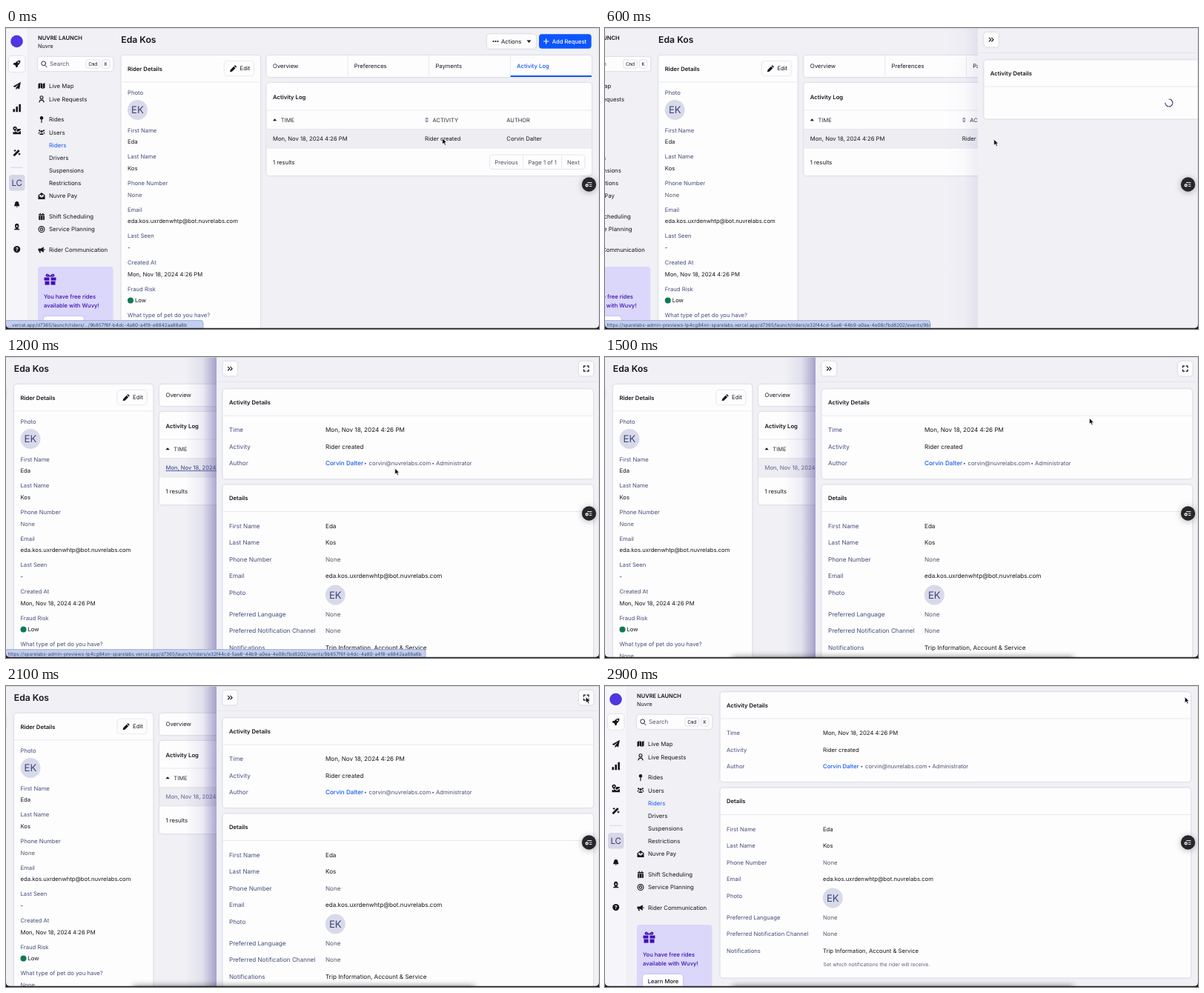
An HTML page that plays this animation: 800 px wide and 406 px high, repeating every 3000 ms.

```html
<!DOCTYPE html>
<html lang="en">
<head>
<meta charset="utf-8">
<title>Rider activity log</title>
<style>
  html, body { margin: 0; width: 100%; height: 100%; overflow: hidden; background: #f0f0f5; }
  svg { display: block; width: 800px; height: 406px; font-family: Inter, sans-serif; text-rendering: geometricPrecision; }
  .card { fill: #fdfdfe; filter: drop-shadow(0 .6px 1px rgba(30, 35, 80, .22)); }
  .mono { font-family: "Noto Sans Mono", monospace; }
  #badge { filter: drop-shadow(0 1px 4px rgba(0, 0, 0, .3)); }
  #dock { filter: blur(4px); }
</style>
</head>
<body>
<svg id="stage" viewBox="0 0 800 406"></svg>
<script>
const INK = '#15161c', LABEL = '#434d7a', MUTED = '#555a6c', BLUE = '#1659f2', RULE = '#e3e4eb';
const FIRST = 'Eda', LAST = 'Kos', MAIL = 'eda.kos.uxrdenwhtp@bot.nuvrelabs.com', CREATED = 'Mon, Nov 18, 2024 4:26 PM';
const ITEM = '9b857f6f-b4dc-4a80-a4f8-e8842aa88a6b';
const SHORT_URL = '...vercel.app/d7365/launch/riders/.../' + ITEM;
const LONG_URL = 'https://sparelabs-admin-previews-lp4cg84xn-sparelabs.vercel.app/d7365/launch/riders/' +
  'e32f44cd-5ae6-44b9-a0ea-4e08cfbd8202/events/' + ITEM;

// Solid icons on a 16-unit grid
const ICONS = {
  rocket: 'M15 1C10 .5 7 3 5 6H2L0 10h3l3 3v3l4-2v-3c3-2 5.500-5 5-10zM11 3.500a1.500 1.500 0 110 3 1.500 1.500 0 010-3z',
  plane: 'M16 0L0 9l4 2 8-7-6 8v4l3-3 4 2z',
  bars: 'M0 10h4v6H0zM6 5h4v11H6zM12 0h4v16h-4z',
  place: 'M4 0a4 4 0 014 4c0 2-4 6-4 6S0 6 0 4a4 4 0 014-4zM4 2.500a1.500 1.500 0 100 3 1.500 1.500 0 000-3zM9 5h7v2l-6 4-3-2zM0 11l3 1 2-2 5 3 6-4v7H0z',
  wand: 'M0 13L11 2l3 3L3 16zM4 1l1 2 2 1-2 1-1 2-1-2-2-1 2-1zM13 8l1 2 2 1-2 1-1 2-1-2-2-1 2-1z',
  bell: 'M8 0c4 1 5 3 5 6l2 6H1l2-6c0-3 1-5 5-6zM6 13h4a2 2 0 01-4 0z',
  agent: 'M8 0a5 5 0 015 5v2a5 5 0 01-10 0V5a5 5 0 015-5zM6 5v2a2 2 0 004 0V5zM1 16c0-3 3-4 7-4s7 1 7 4z',
  map: 'M0 3l5-2v12l-5 2zM6 1l4 2v12l-4-2zM11 3l5-2v12l-5 2z',
  person: 'M8 0a4.500 4.500 0 110 9 4.500 4.500 0 010-9zM8 2a2.500 2.500 0 100 5 2.500 2.500 0 000-5zM1 16l3-6h8l3 6h-2.500l-2-4h-5l-2 4z',
  pin: 'M8 0a4 4 0 011 7.900V16H7V7.900A4 4 0 018 0z',
  users: 'M8 3a3 3 0 110 6 3 3 0 010-6zM3 14c0-5 10-5 10 0zM3 2a2 2 0 110 4 2 2 0 010-4zM13 2a2 2 0 110 4 2 2 0 010-4zM0 11c0-4 4-4 4-3l-2 3zM16 11c0-4-4-4-4-3l2 3z',
  wallet: 'M0 6l8-6 8 6v10H0zM3 5v4l5 3 5-3V5zM6 6h4v2H6z',
  calendar: 'M1 2h3V0h2v2h4V0h2v2h3v3H1zM1 6h14v10H1zM4 8v2h2V8zM10 8v2h2V8zM4 12v2h2v-2zM10 12v2h2v-2z',
  gear: 'M6 0h4v3l3-2 2 3-2 2h3v4h-3l2 2-2 3-3-2v3H6v-3l-3 2-2-3 2-2H0V6h3L1 4l2-3 3 2zM8 5a3 3 0 100 6 3 3 0 000-6z',
  target: 'M8 0a8 8 0 110 16A8 8 0 018 0zM8 2a6 6 0 100 12A6 6 0 008 2zM8 4a4 4 0 110 8 4 4 0 010-8zM8 6a2 2 0 100 4 2 2 0 000-4z',
  horn: 'M0 5h6l7-4v13l-7-4H5l1 5H3l-1-5H0zM14 6h2v3h-2z',
  gift: 'M0 5h7v4H0zM9 5h7v4H9zM1 10h6v5H1zM9 10h6v5H9zM4 0c2 0 4 3 4 3s2-3 4-3 3 4 0 4H4C1 4 2 0 4 0zM4 1.500v1h2zM12 1.500v1h-2z',
  pencil: 'M0 16l1-5 8-8 4 4-8 8zM10 2l2-2 4 4-2 2z'
};

const text = (x, y, str, { size = 7.7, fill = INK, weight = 400, extra = '' } = {}) =>
  `<text x="${x}" y="${y + size * .36}" font-size="${size}" fill="${fill}" font-weight="${weight}" ${extra}>${str}</text>`;
const title = (x, y, str) => text(x, y, str, { weight: 600 });
const rect = (x, y, w, h, fill, rx = 0, extra = '') =>
  `<rect x="${x}" y="${y}" width="${w}" height="${h}" fill="${fill}" rx="${rx}" ${extra}/>`;
const card = (x, y, w, h) => rect(x, y, w, h, '', 4, 'class="card"');
const hline = (x, y, w) => rect(x, y - .4, w, .8, RULE);
const path = (d, fill = INK, extra = '') => `<path d="${d}" fill="${fill}" ${extra}/>`;
const stroke = (d, color = INK, width = 1.1) =>
  path(d, 'none', `stroke="${color}" stroke-width="${width}" stroke-linecap="round"`);
const circle = (x, y, r, fill) => `<circle cx="${x}" cy="${y}" r="${r}" fill="${fill}"/>`;
const icon = (name, x, y, size = 9, fill = INK) =>
  path(ICONS[name], fill, `fill-rule="evenodd" transform="translate(${x - size / 2} ${y - size / 2}) scale(${size / 16})"`);
const group = (id, body, extra = '') => `<g id="${id}" ${extra}>${body}</g>`;
const centered = 'text-anchor="middle"';
const avatar = (x, y) => circle(x, y, 13.5, '#d8daea') +
  text(x, y, 'EK', { size: 13.2, fill: '#3d4575', extra: centered });

function sidebar() {
  const rail = [['plane', 78], ['bars', 108], ['place', 138], ['wand', 168], ['bell', 238], ['agent', 268]];
  const menu = [['Live Map', 78, 'map'], ['Live Requests', 95.7, 'person'], ['Rides', 123.5, 'pin'], ['Users', 140.7, 'users'],
    ['Riders', 158], ['Drivers', 175], ['Suspensions', 192.2], ['Restrictions', 209.4], ['Nuvre Pay', 226.6, 'wallet'],
    ['Shift Scheduling', 254.3, 'calendar'], ['Service Planning', 271.5, 'target'], ['Rider Communication', 299.3, 'horn']];
  const promo = { fill: '#3c0cae', weight: 500, size: 7.6 };
  const key = (x, w, str) => rect(x, 43, w, 11, '#fff', 2, 'stroke="#d3d5df" stroke-width=".7"') +
    text(x + w / 2, 48.3, str, { size: 6.8, extra: `class="mono" ${centered}` });
  return rect(0, 0, 29.5, 406, '#f6f6fa') + rect(29.3, 0, .7, 406, '#e6e7ee') +
    circle(14.5, 18, 8.3, '#4f36e0') + card(4, 38, 21.5, 21) + icon('rocket', 14.7, 48.3, 10.5) +
    rail.map(([name, y]) => icon(name, 14.7, y, y > 200 ? 8.5 : 10.5)).join('') +
    rect(6, 187.7, 17, 1, '#d5d6df') + rect(4, 198, 21.5, 21.5, '#d6d6e7', 4) +
    text(14.7, 208.7, 'LC', { size: 11.5, fill: '#343b70', extra: centered }) +
    circle(14.7, 298.5, 4.5, INK) + text(14.7, 298.6, '?', { size: 7, fill: '#fff', weight: 700, extra: centered }) +
    text(43, 13.3, 'NUVRE LAUNCH', { size: 7.5, weight: 600 }) + text(43, 24.5, 'Nuvre', { size: 7.3 }) +
    card(43, 39, 101.5, 19) + stroke('M53 50.500l2 2.200M53.600 47.800a2.900 2.900 0 11-5.800 0a2.900 2.900 0 015.800 0', INK, .9) +
    text(59, 48.5, 'Search', { size: 7.9, fill: MUTED }) + key(108, 18.5, 'Cmd') + key(129.5, 10.5, 'K') +
    menu.map(([label, y, name]) => (name ? icon(name, 48, y) : '') +
      text(58, y, label, { size: 7.8, fill: label === 'Riders' ? BLUE : INK })).join('') +
    rect(43, 322, 101.5, 100, '#dad7fb', 4) + icon('gift', 59.5, 339.5, 16, '#4110b4') +
    text(51, 362.3, 'You have free rides', promo) + text(51, 374.3, 'available with Wuvy!', promo) +
    card(51, 389, 54, 20) + text(57.7, 398.3, 'Learn More', { size: 7.6, weight: 500 });
}

function riderCard() {
  const fields = [['First Name', 138, FIRST], ['Last Name', 173.6, LAST], ['Phone Number', 209.2, 'None'],
    ['Email', 244.9, MAIL], ['Last Seen', 280.5, '-'], ['Created At', 316.1, CREATED],
    ['Fraud Risk', 351.8, 'Low'], ['What type of pet do you have?', 387.4, 'None']];
  return text(155.3, 15.5, `${FIRST} ${LAST}`, { size: 12.2, weight: 600 }) + card(155.5, 37, 187.5, 380) +
    title(164, 55, 'Rider Details') + card(295, 45, 39, 19) + icon('pencil', 306.7, 54.7, 9.2) + text(315.6, 54.7, 'Edit') +
    hline(155.5, 73, 187.5) + text(164, 87.5, 'Photo', { fill: LABEL }) + avatar(177.5, 110.5) +
    circle(168, 367.4, 4, '#0f7a55') +
    fields.map(([label, y, value]) => text(164, y, label, { fill: LABEL }) +
      text(value === 'Low' ? 174 : 164, y + 15.7, value, { fill: value === 'None' ? MUTED : INK })).join('');
}

function activityLog() {
  const tabs = ['Overview', 'Preferences', 'Payments', 'Activity Log'];
  const head = { size: 7.5, fill: '#2c2e38' }, pager = { fill: '#4d5160', extra: centered };
  return card(649, 8.3, 66, 19.5) + [657.5, 660.5, 663.5].map(x => circle(x, 18, 1.1, INK)).join('') +
    text(668, 18, 'Actions') + path('M702.500 16.500h6l-3 3.500z') +
    rect(719, 8.3, 70.7, 19.5, '#0d55ff', 4) + stroke('M725.500 18h6.400M728.700 14.800v6.400', '#fff', 1.2) +
    text(736.8, 18, 'Add Request', { fill: '#fff', weight: 500, size: 7.6 }) +
    card(351.5, 37, 438.5, 29) + rect(680.5, 64, 109.5, 2, BLUE) +
    tabs.map((label, i) => text(360 + i * 109.7, 51.3, label, { fill: i === 3 ? BLUE : INK, weight: i === 3 ? 500 : 400 }) +
      (i ? rect(351 + i * 109.7, 37, .8, 28, RULE) : '')).join('') +
    card(351.5, 74, 438.5, 125) + title(360, 93, 'Activity Log') + hline(351.5, 111, 438.5) +
    path('M360 125.300h5.200l-2.600-3z') + text(370.8, 124, 'TIME', head) +
    path('M565 123.300h5.200l-2.600-2.700zM565 124.800h5.200l-2.600 2.700z', '#7d83a6') + text(575.5, 124, 'ACTIVITY', head) +
    text(675.3, 124, 'AUTHOR', head) +
    rect(351.5, 136.5, 438.5, 25.5, '#ededf2') + hline(351.5, 136.5, 438.5) + hline(351.5, 162, 438.5) +
    text(360, 149.5, CREATED, { size: 7.65, extra: 'id="link"' }) + text(565, 149.5, 'Rider created', { size: 7.65 }) +
    text(675.3, 149.5, 'Corvin Dalter', { size: 7.65 }) + text(360, 181, '1 results') +
    rect(652.5, 171, 128.5, 19.5, '#fdfdfe', 4, `stroke="${RULE}" stroke-width=".9"`) +
    rect(697.3, 171, .8, 19.5, RULE) + rect(749.3, 171, .8, 19.5, RULE) +
    text(675, 181, 'Previous', pager) + text(723.7, 181, 'Page 1 of 1', pager) + text(765.5, 181, 'Next', pager);
}

// Event details, in drawer coordinates
function eventDetails(id, size, width) {
  const muted = { fill: '#4c5370' }, shift = size > 8 ? 1.5 : 0;
  const row = ([label, y, value]) => text(17, y, label, { size, fill: LABEL }) +
    text(147, y, value, { size, fill: value === 'None' ? MUTED : INK });
  const bullet = x => circle(x + shift, 143.7, 1, muted.fill);
  return card(8.5, 43.3, width, 120.7) + title(17, 61.3, 'Activity Details') + hline(8.5, 79, width) +
    [['Time', 98.5, CREATED], ['Activity', 121, 'Rider created'], ['Author', 143.5, '']].map(row).join('') +
    group(id + 'Author', text(147, 143.5, 'Corvin Dalter', { size, fill: BLUE, weight: 500 }) + bullet(199.3) +
      text(204 + shift, 143.5, 'corvin@nuvrelabs.com', muted) + bullet(290.7) +
      text(294.5 + shift, 143.5, 'Administrator', muted)) +
    card(8.5, 172.5, width, 256) + title(17, 190.5, 'Details') + hline(8.5, 208.5, width) +
    [['First Name', 228, FIRST], ['Last Name', 250.5, LAST], ['Phone Number', 273, 'None'], ['Email', 295.4, MAIL],
      ['Photo', 318, ''], ['Preferred Language', 347, 'None'], ['Preferred Notification Channel', 369.5, 'None'],
      ['Notifications', 392, 'Trip Information, Account &amp; Service']].map(row).join('') +
    avatar(160.3, 321) + text(147.5, 410.3, 'Set which notifications the rider will receive.', { size: 6.9, fill: '#5d6275' });
}

function drawer() {
  return rect(-42, 0, 42, 406, 'url(#edge)', 0, 'id="shade"') + rect(0, 0, 520, 406, '#f0f0f5') + hline(0, 33.6, 520) +
    card(8.5, 6, 19.5, 19.5) + stroke('M15.500 13.400l2.300 2.300-2.300 2.300M18.800 13.400l2.300 2.300-2.300 2.300') +
    card(489, 6, 19.5, 19.5) +
    stroke('M495.500 14.200v-2h2M500 12.200h2v2M502 17.200v2h-2M497.500 19.200h-2v-2', INK, 1.3) +
    group('loading', card(8.5, 43.3, 499.5, 79.2) + title(17, 61.3, 'Activity Details') + hline(8.5, 79, 499.5) +
      group('spinner', stroke('M0 -5A5 5 0 1 1 -5 0', '#434a78', 1.2))) +
    group('loaded', eventDetails('drawer', 8.13, 499.5));
}

document.getElementById('stage').innerHTML =
  `<defs><linearGradient id="edge"><stop stop-color="#5a529e" stop-opacity="0"/>
    <stop offset=".55" stop-color="#5a529e" stop-opacity=".1"/><stop offset="1" stop-color="#5a529e" stop-opacity=".5"/></linearGradient>
    <clipPath id="bubble"><rect id="bubbleClip" y="390" height="16"/></clipPath></defs>` +
  rect(0, 0, 800, 406, '#f0f0f5') +
  group('page', sidebar() + group('home', riderCard() + activityLog())) +
  group('full', eventDetails('full', 7.7, 634.5), 'transform="translate(147 -35)"') +
  group('drawer', drawer()) +
  group('dock', rect(172, 405, 460, 12, '#0008')) +
  group('badge', circle(786.5, 211, 9.7, '#26262b')) + icon('gear', 783.7, 212.3, 4.5, '#fff') +
  stroke('M784.500 208.500h5.500M787.300 211h2.700M787.300 213.500h2.700', '#fff', .9) +
  group('status', rect(-4, 394.5, 0, 14, '#c3cfee', 3, 'id="bubbleBox" stroke="#93a4d0" stroke-width=".8"') +
    text(2.5, 400.2, SHORT_URL, { size: 6.4, fill: '#35456f', extra: 'id="url" clip-path="url(#bubble)"' })) +
  rect(0, 0, 800, .7, '#c9cad3') + rect(799.3, 0, .7, 406, '#d5d6de') +
  path('M0 399.500Q0 404.800 5.500 404.800H794.500Q800 404.800 800 399.500V406H0Z', '#17181c') +
  group('cursor', path('M0 0v8l1.900-1.700 1.400 3 1.500-.7-1.400-2.900h2.500z', '#000', 'stroke="#fff" stroke-width=".7"'));

const el = id => document.getElementById(id);
const show = (id, on) => el(id).setAttribute('display', on ? 'inline' : 'none');
const move = (id, x, y = 0, turn = 0) => el(id).setAttribute('transform', `translate(${x} ${y}) rotate(${turn})`);
const clamp = v => Math.min(1, Math.max(0, v));
const smooth = v => (v = clamp(v)) * v * (3 - 2 * v);

// cubic-bezier(.25, .1, .25, 1)
function ease(v) {
  v = clamp(v);
  let lo = 0, hi = 1, s = .5;
  for (let i = 0; i < 20; i++) {
    s = (lo + hi) / 2;
    const x = .75 * s * (1 - s) + s ** 3;
    if (x < v) lo = s; else hi = s;
  }
  return .3 * s * (1 - s) ** 2 + 3 * s * s * (1 - s) + s ** 3;
}

function render(t) {
  const full = t >= 2200, open = t > 500 && !full, loaded = t >= 1000, away = t >= 1300;
  const slide = t > 500 ? ease((t - 500) / 300) : 0;
  move('page', full ? 0 : -144.5 * slide);
  move('drawer', 800 - 516 * slide);
  el('shade').setAttribute('opacity', slide ** 3);
  show('home', !full);
  show('full', full);
  show('drawer', open);
  show('loading', !loaded);
  show('loaded', loaded);
  show('drawerAuthor', t >= 1100);
  show('fullAuthor', t >= 2400);
  show('dock', away);
  move('spinner', 258, 101, (t - 600) * .36);

  const link = el('link');
  link.setAttribute('fill', away ? '#5a628c' : loaded ? '#2b3f86' : INK);
  link.setAttribute('text-decoration', loaded && !away ? 'underline' : 'none');

  show('status', !away);
  const width = 266 + 300 * slide;
  el('bubbleBox').setAttribute('width', width + 4);
  el('bubbleClip').setAttribute('width', width);
  el('url').textContent = slide ? LONG_URL : SHORT_URL;

  const drift = smooth((t - 100) / 400), reach = smooth((t - 1200) / 600);
  move('cursor', 588.7 - 64 * drift + 257.5 * reach, 148.8 + 1.4 * drift - 135.5 * reach);
}

function tick() {
  render(Math.floor(performance.now() % 3000 / 100) * 100);
  requestAnimationFrame(tick);
}
tick();
</script>
</body>
</html>
```
